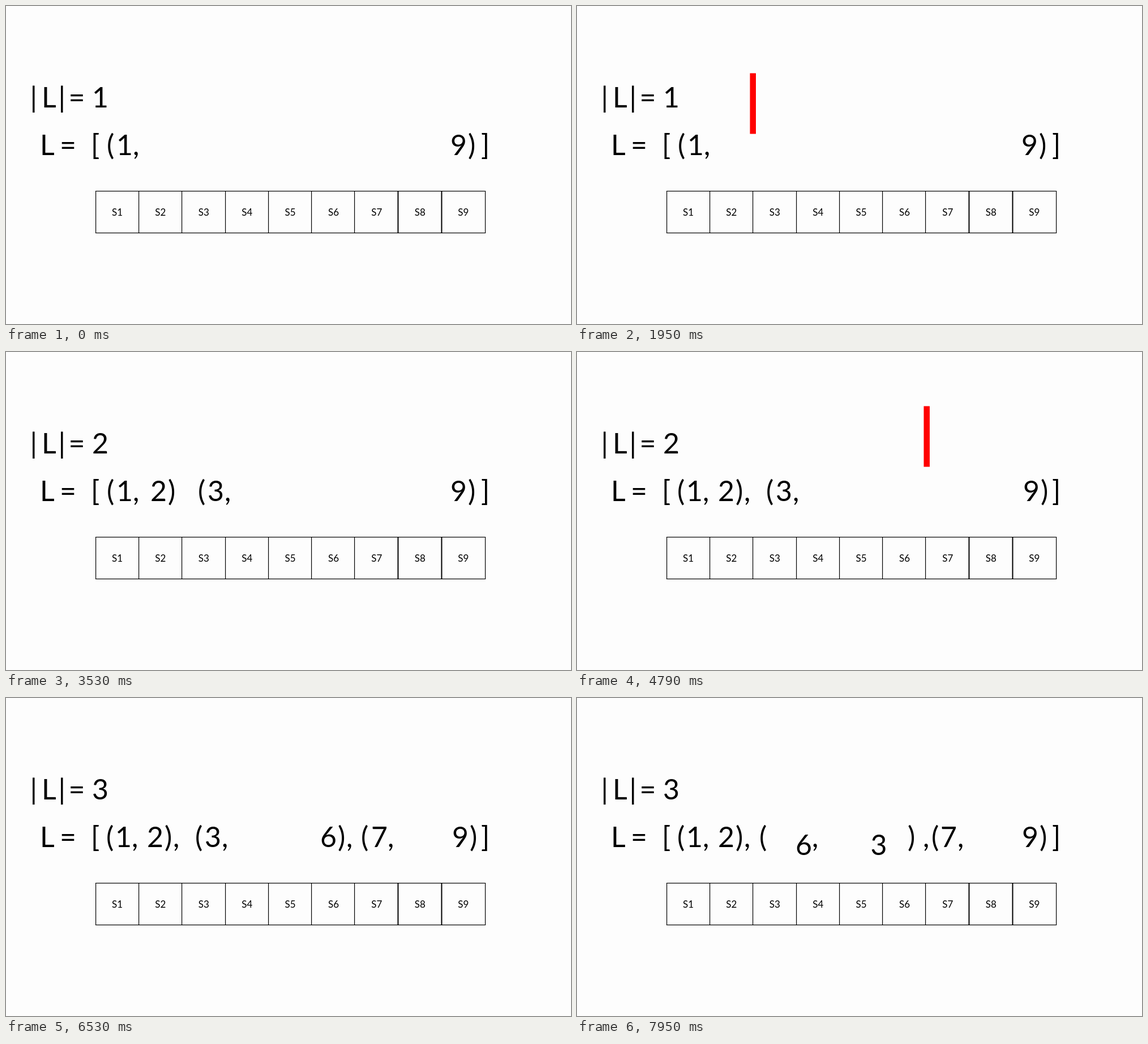
An HTML page with a canvas that plays this animation: 998 px wide and 561 px high, repeating every 7990 ms.

```html
<!DOCTYPE html>
<html lang="en">
<head>
<meta charset="utf-8">
<title>Splitting a list</title>
<style>
  html, body { margin: 0; width: 100%; height: 100%; overflow: hidden; background: #fdfdfd; }
  canvas { display: block; width: 998px; height: 561px; }
</style>
</head>
<body>
<canvas id="stage" width="998" height="561"></canvas>
<script>
const ctx = document.getElementById('stage').getContext('2d');
const LOOP = 7990;
const SIZE_ROW = 179, LIST_ROW = 263;
const BIG = '50px Lato, Carlito, sans-serif';
const SMALL = '17px Lato, Carlito, sans-serif';

const clamp = v => Math.min(1, Math.max(0, v));
const span = (t, start, length) => clamp((t - start) / length);
const ease = p => p < 0.5 ? 2 * p * p : 1 - 2 * (1 - p) * (1 - p);
const mix = (a, b, p) => a + (b - a) * p;

// Times inside one cut, relative to its start
const BAR_IN = 750, DROP = 500, TEXT_IN = 1000, BAR_OUT = 290;
const DROP_HEIGHT = 142;

const cuts = [
  { start: 990, x: 305.5, y: 68 },
  { start: 3926, x: 612.5, y: 80.5 }
];
const SECOND_LIST = 3930, SWAP_LIST = 6570, SWAP_START = 6536, SWAP_TIME = 2000;

// Draws each character with its ink starting at the given x
function glyphs(text, xs, baseline, alpha = 1) {
  if (alpha <= 0) return;
  ctx.font = BIG;
  ctx.fillStyle = '#000';
  ctx.textAlign = 'left';
  ctx.globalAlpha = alpha;
  [...text].forEach((c, i) => {
    ctx.fillText(c, xs[i] + ctx.measureText(c).actualBoundingBoxLeft, baseline);
  });
  ctx.globalAlpha = 1;
}

const list = (text, xs, alpha) => glyphs(text, xs, LIST_ROW, alpha);

function listSize(n, alpha) {
  glyphs('|L|=' + n, [46.5, 67, 96.5, 113.5, n === 1 ? 156 : 154], SIZE_ROW, alpha);
}

function sizeChange(n, p) {
  listSize(n, 1 - p);
  listSize(n + 1, p);
}

function table() {
  ctx.fillStyle = '#000';
  ctx.fillRect(158, 326, 689, 1.2);
  ctx.fillRect(158, 399.8, 689, 1.2);
  for (let i = 0; i < 10; i++) {
    const wide = i === 7 || i === 8;
    const x = Math.round(158 + i * 76.2 + (i > 6 ? (i - 6) * 0.75 : 0));
    ctx.fillRect(Math.min(x, 846) - (wide ? 0.5 : 0), 326, wide ? 2 : 1.2, 75);
  }
  ctx.font = SMALL;
  ctx.textAlign = 'center';
  for (let i = 0; i < 9; i++) {
    ctx.fillText('S' + (i + 1), 196.5 + i * 76.4, 370);
  }
}

function bar(cut, t) {
  const dt = t - cut.start;
  const fadeOut = span(dt, BAR_IN + DROP + TEXT_IN, BAR_OUT);
  const alpha = span(dt, 0, BAR_IN) * (1 - fadeOut);
  if (alpha <= 0) return;
  ctx.globalAlpha = alpha;
  ctx.fillStyle = '#f00';
  ctx.fillRect(cut.x, cut.y + DROP_HEIGHT * ease(span(dt, BAR_IN, DROP)), 10.5, 107);
  ctx.globalAlpha = 1;
}

const reveal = (cut, t) => span(t, cut.start + BAR_IN + DROP, TEXT_IN);

function firstList(t) {
  const p = reveal(cuts[0], t);
  sizeChange(1, p);
  list('(1,9)', [180, 199, 226, 787, 817]);
  list('2)(3,', [257, 287, 341, 358, 388], p);
}

function leftPair() {
  list('(1,2),', [179, 197, 224, 251, 281, 297]);
}

function secondList(t) {
  const p = reveal(cuts[1], t);
  sizeChange(2, p);
  leftPair();
  list('(3,9)', [336, 353, 383, 790, 820]);
  list('6),(7,', [557, 587, 603, 629, 647, 676], p);
}

function swapList(t) {
  const p = ease(span(t, SWAP_START, SWAP_TIME));
  const row = LIST_ROW + 24.5 * 4 * p * (1 - p);
  listSize(3);
  leftPair();
  list('(,),(7,9)', [324, 417, 585, 613, 628, 644, 674, 788, 818]);
  glyphs('36', [mix(353, 555, p), mix(557, 353, p)], row);
}

function draw(t) {
  ctx.fillStyle = '#fdfdfd';
  ctx.fillRect(0, 0, 998, 561);
  table();
  list('L=[]', [64, 98, 154, 840]);
  if (t < SECOND_LIST) firstList(t);
  else if (t < SWAP_LIST) secondList(t);
  else swapList(t);
  cuts.forEach(cut => bar(cut, t));
}

const begin = performance.now();
function tick() {
  draw((performance.now() - begin) % LOOP);
  requestAnimationFrame(tick);
}
tick();
</script>
</body>
</html>
```
